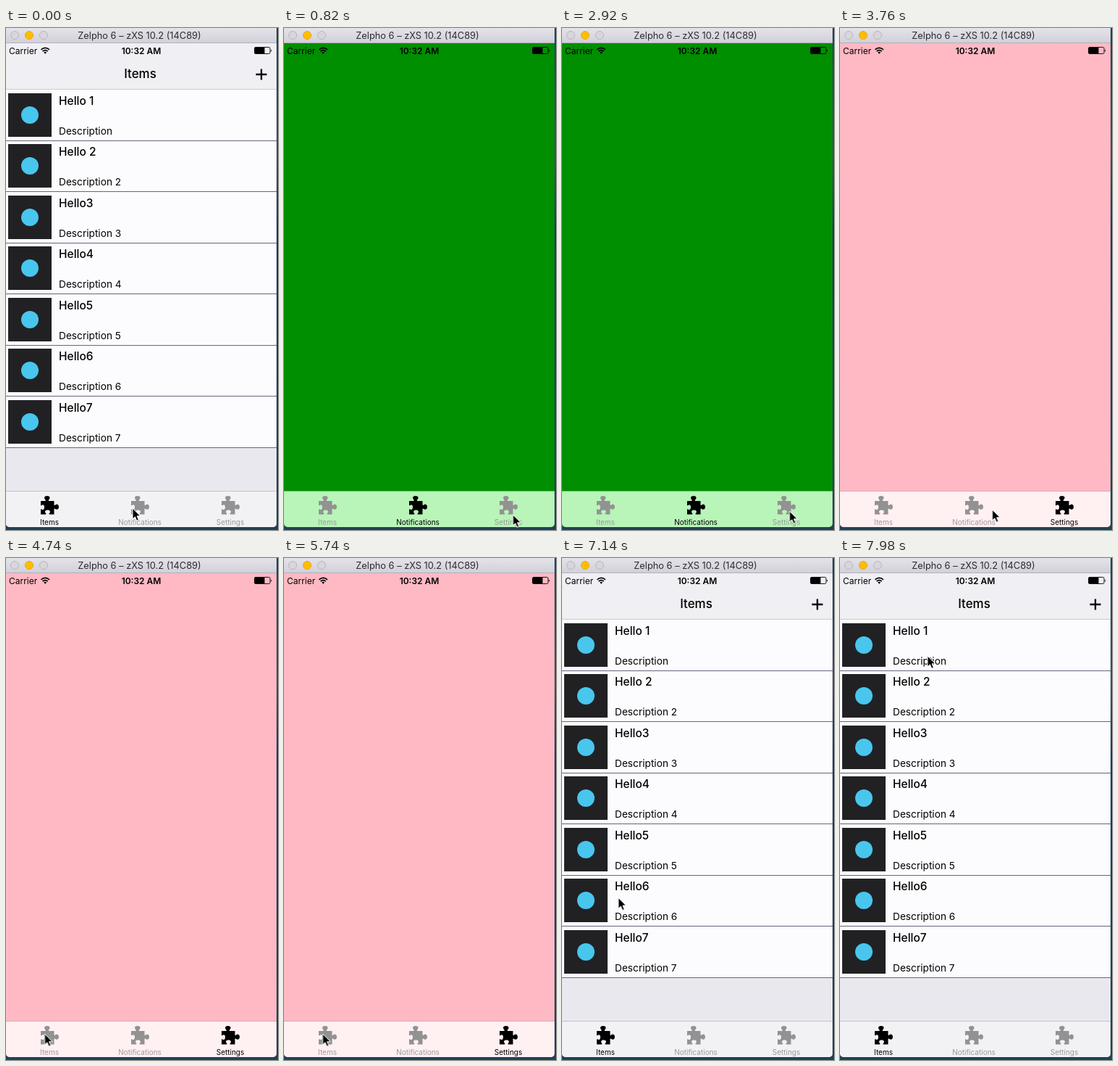
Write an HTML page that moves like this. It is 376 by 692 pixels and loops after 8 s.

```html
<!DOCTYPE html>
<html lang="en">
<head>
<meta charset="utf-8">
<title>Tab navigation</title>
<style>
  html, body { margin: 0; width: 100%; height: 100%; overflow: hidden; background: #1c3c55; }
  svg { display: block; width: 376px; height: 692px; font-family: Inter, Roboto, sans-serif; }

  #app { animation: tabs 8s step-end infinite; }
  #screen { fill: var(--screen); }
  #list { visibility: var(--list); }
  #bar { fill: var(--bar); }
  #barLine { fill: var(--line); }
  .tab { font-size: 10px; text-anchor: middle; }
  .tab use { fill: var(--icon); }
  .tab text { fill: var(--label); }
  #tab0 { --icon: var(--icon0); --label: var(--label0); }
  #tab1 { --icon: var(--icon1); --label: var(--label1); }
  #tab2 { --icon: var(--icon2); --label: var(--label2); }

  @keyframes tabs {
    0%, 76%, 100% {
      --screen: #e9e8ee; --bar: #f2f2f4; --line: #c3c3c8; --list: visible;
      --icon0: #000; --label0: #000;
      --icon1: #929294; --label1: #98989a;
      --icon2: #929294; --label2: #98989a;
    }
    3% {
      --screen: #008f00; --bar: #b9f4b9; --line: #79b879; --list: hidden;
      --icon0: #929292; --label0: #949e94;
      --icon1: #000; --label1: #000;
      --icon2: #929292; --label2: #949e94;
    }
    38.5% {
      --screen: #ffb9c4; --bar: #fff0f2; --line: #d1aeb5; --list: hidden;
      --icon0: #929292; --label0: #a0989a;
      --icon1: #929292; --label1: #a0989a;
      --icon2: #000; --label2: #000;
    }
  }

  #cursor { animation: point 8s ease-in-out infinite; }
  @keyframes point {
    0%, 4.5% { transform: translate(175px, 662px); }
    9.75%, 20% { transform: translate(316.5px, 671px); }
    30%, 40% { transform: translate(314.5px, 666px); }
    46%, 47.5% { transform: translate(210.5px, 664px); }
    54%, 83% { transform: translate(53.5px, 656px); }
    98%, 100% { transform: translate(121px, 135px); }
  }
</style>
</head>
<body>
<svg viewBox="0 0 376 692">
  <defs>
    <linearGradient id="chrome" x2="0" y2="1">
      <stop stop-color="#e5e3ea"/><stop offset="1" stop-color="#d2d0d8"/>
    </linearGradient>
    <linearGradient id="desktop" x2="0" y2="1">
      <stop stop-color="#1a4360"/><stop offset=".25" stop-color="#474a58"/>
      <stop offset=".4" stop-color="#1a3862"/><stop offset="1" stop-color="#1f4254"/>
    </linearGradient>
    <clipPath id="window"><path d="M0 0H374V683a5 5 0 0 1-5 5H5a5 5 0 0 1-5-5Z"/></clipPath>
    <path id="puzzle" d="M1 7H7.5C8.5 5.5 6 4.5 6 2.5C6 .8 8 0 9.8 0S13.6 .8 13.6 2.5C13.6 4.5 11 5.5 12 7H19.5V12.5C20.5 14 21.5 11.5 23 11.5C25 11.5 26 13.3 26 15.2S25 18.8 23 18.8C21.5 18.8 20.5 16.5 19.5 18V25.5H13C11.5 24.5 14 23.5 14 22C14 20 12 19.5 10.5 19.5S7 20 7 22C7 23.5 9.5 24.5 8 25.5H1V18.5C2 17.5 2.5 19 4 19C5.5 19 6 17 6 15.5S5.5 12.3 4 12.3C2.5 12.3 2 14 1 13Z"/>
  </defs>

  <rect width="376" height="692" fill="url(#desktop)"/>
  <g id="app" clip-path="url(#window)">
    <rect id="screen" y="20" width="374" height="668"/>

    <g id="list">
      <rect y="20" width="374" height="64" fill="#f0eff3"/>
      <rect y="84" width="374" height="1" fill="#cbcad0"/>
      <rect y="85" width="374" height="494" fill="#fcfcfe"/>
      <text x="185.5" y="69" font-size="17" font-weight="500" text-anchor="middle">Items</text>
      <path d="M345.5 64H360.5M353 56.5V71.5" stroke="#000" stroke-width="2.3"/>
      <g id="rows"></g>
    </g>

    <rect width="374" height="20" fill="url(#chrome)"/>
    <rect y="20" width="374" height="1" fill="#b3b1b8"/>
    <g fill="#d8d6dc" stroke="#b9b7be">
      <circle cx="12" cy="10" r="5.5"/>
      <circle cx="32" cy="10" r="5.5" fill="#ffbd00" stroke="#e8a818"/>
      <circle cx="52" cy="10" r="5.5"/>
    </g>
    <text x="184.5" y="15" font-size="12.8" text-anchor="middle" fill="#2c2c30">Zelpho 6 – zXS 10.2 (14C89)</text>

    <g id="status" font-size="12">
      <text x="4" y="35.5">Carrier</text>
      <path d="M48.5 29.8Q54.2 24.8 60 29.8M50.6 32.2Q54.2 29 57.8 32.2" fill="none" stroke="#000" stroke-width="1.7"/>
      <path d="M52.2 33.6Q54.2 32 56.2 33.6L54.2 35.8Z"/>
      <text x="187" y="35.5" font-weight="600" text-anchor="middle">10:32 AM</text>
      <rect x="343.5" y="26.5" width="21.5" height="9" rx="1.5" fill="none" stroke="#000" stroke-width=".9"/>
      <path d="M344 27H357.5V35H344ZM366 29.5Q368 31 366 33Z"/>
    </g>

    <rect id="bar" y="638" width="374" height="50"/>
    <rect id="barLine" y="638" width="374" height="1"/>
    <g id="tabs"></g>
  </g>

  <path id="cursor" d="M0 0V15L3.4 11.8L5.8 17.3L8.4 16.2L6.1 10.8H10.8Z" stroke="#fff" stroke-width="1" stroke-linejoin="round"/>
</svg>
<script>
  const fill = (id, html) => { document.getElementById(id).innerHTML = html; };

  const row = (_, i) => {
    const n = i + 1;
    const name = n < 3 ? `Hello ${n}` : `Hello${n}`;
    const detail = n < 2 ? "Description" : `Description ${n}`;
    return `<g transform="translate(0 ${85 + Math.round(i * 70.45)})">
      <rect y="70" width="374" height="1" fill="#66667c"/>
      <rect x="3" y="5" width="60" height="60" fill="#212124"/>
      <circle cx="33" cy="35" r="12" fill="#48c6ee"/>
      <text x="73" y="20.5" font-size="15.5" font-weight="500">${name}</text>
      <text x="73" y="61.5" font-size="13.7">${detail}</text>
    </g>`;
  };

  const tab = (label, i) => `<g id="tab${i}" class="tab" transform="translate(${60 + i * 125} 0)">
      <use href="#puzzle" x="-13" y="645"/>
      <text y="684.5">${label}</text>
    </g>`;

  fill("rows", Array.from({ length: 7 }, row).join(""));
  fill("tabs", ["Items", "Notifications", "Settings"].map(tab).join(""));
</script>
</body>
</html>
```
